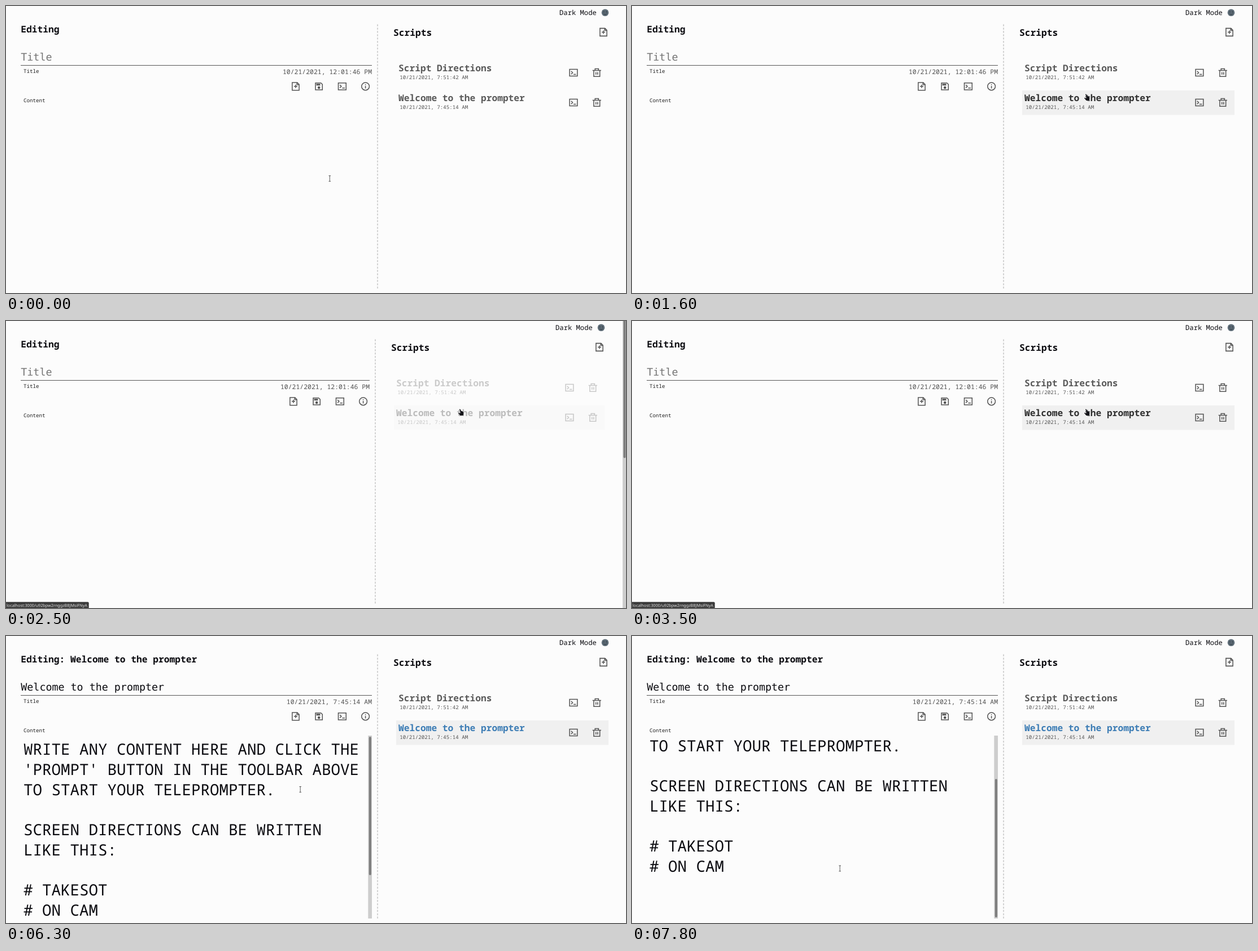
Recreate the animation shown at these times as an HTML page with a canvas. Size 1098 by 510 pixels, loop 8 s.

```html
<!DOCTYPE html>
<html lang="en">
<head>
<meta charset="utf-8">
<title>Prompter editor</title>
<style>
html, body { margin: 0; width: 100%; height: 100%; overflow: hidden; background: #fcfcfc; }
canvas { display: block; width: 1098px; height: 510px; }
</style>
</head>
<body>
<canvas id="stage"></canvas>
<script>
const W = 1098, H = 510, LOOP = 8000;
const MONO = '"Noto Sans Mono", "Liberation Mono", monospace';
const FIELD = '"DejaVu Sans Mono", monospace';
const INK = '#0b0b10', GREY = '#5a5a5a', BLUE = '#3d7db5';

const canvas = document.getElementById('stage');
const ctx = canvas.getContext('2d');
const dpr = window.devicePixelRatio || 1;
canvas.width = W * dpr;
canvas.height = H * dpr;
ctx.textRendering = 'geometricPrecision';

const LINES = [
  'WRITE ANY CONTENT HERE AND CLICK THE',
  "'PROMPT' BUTTON IN THE TOOLBAR ABOVE",
  'TO START YOUR TELEPROMPTER.',
  '',
  'SCREEN DIRECTIONS CAN BE WRITTEN',
  'LIKE THIS:',
  '',
  '# TAKESOT',
  '# ON CAM'
];
const SCRIPTS = [
  { title: 'Script Directions', date: '10/21/2021, 7:51:42 AM', y: 116 },
  { title: 'Welcome to the prompter', date: '10/21/2021, 7:45:14 AM', y: 169 }
];

// Icons on a 24 unit grid: stroked lines plus optional filled parts
const ICONS = {
  add: { line: 'M4 3H15.6L20 7.4V21H4Z M15 3V8H20 M12 8V16 M8 12H16' },
  save: { line: 'M4 4H16.6L20 7.4V20H4Z', fill: 'M6 6H15V10H6Z M9 15a3 3 0 1 0 6 0a3 3 0 1 0 -6 0' },
  prompt: { line: 'M3 4H21V20H3Z M12 16H18 M6.5 8.5L10 12L6.5 15.5' },
  info: { line: 'M3 12a9 9 0 1 0 18 0a9 9 0 1 0 -18 0 M12 7V9 M12 11V17' },
  trash: { line: 'M2 7H22 M5 7V21H19V7 M8 7V3H16V7 M10 11V17 M14 11V17' }
};
for (const icon of Object.values(ICONS)) {
  icon.line = new Path2D(icon.line);
  if (icon.fill) icon.fill = new Path2D(icon.fill);
}
const HAND = new Path2D('M-1.8 -5.2C-2.4 -6.3 -.9 -6.9 -.3 -5.8L1.2 -2.7C2 -3.1 2.7 -2.9 3 -2.3C3.7 -2.5 4.2 -2 4.4 -1.4C5 -1.4 5.3 -.9 5.3 -.2V3.2L4.6 5.2H-.4L-3.7 1.4C-4.3 .6 -3.3 -.1 -2.5 .4L-1 1.4L-.4 -.9Z');
const ARROW = new Path2D('M0 0V10L2.4 7.8L4 11.2L5.5 10.5L4 7.3H7.2Z');

function text(str, x, y, size, color, { font = MONO, bold = false, align = 'left' } = {}) {
  ctx.font = `${bold ? 'bold ' : ''}${size}px ${font}`;
  ctx.textAlign = align;
  ctx.fillStyle = color;
  ctx.fillText(str, x, y);
}

function rect(x, y, w, h, color, radius = 0) {
  ctx.fillStyle = color;
  ctx.beginPath();
  ctx.roundRect(x, y, w, h, radius);
  ctx.fill();
}

function drawIcon(name, cx, cy) {
  const { line, fill } = ICONS[name];
  const s = 18.33 / 24;
  ctx.save();
  ctx.translate(cx, cy);
  ctx.scale(s, s);
  ctx.translate(-12, -12);
  ctx.strokeStyle = ctx.fillStyle = '#545454';
  ctx.lineWidth = 2;
  ctx.stroke(line);
  if (fill) ctx.fill(fill);
  ctx.restore();
}

function drawMoon(x, y) {
  const disc = (dx, dy, r, color) => {
    ctx.fillStyle = color;
    ctx.beginPath();
    ctx.arc(x + dx, y + dy, r, 0, Math.PI * 2);
    ctx.fill();
  };
  disc(0, 0, 6.3, '#5d6b76');
  disc(-2.2, -1.2, 1, '#2b343b');
  disc(2.2, -1.2, 1, '#2b343b');
  ctx.strokeStyle = '#2b343b';
  ctx.lineWidth = 1;
  ctx.beginPath();
  ctx.arc(x, y + 0.6, 2.8, 0.3, Math.PI - 0.3);
  ctx.stroke();
}

function drawHeader(sl, sr) {
  text('Dark Mode', 980 - sr, 16.3, 12.2, INK);
  drawMoon(1061 - sr, 11.8);
  text('Scripts', 686 - sl, 53, 16.25, INK, { bold: true });
  drawIcon('add', 1058 - sr, 46.5);
  ctx.strokeStyle = '#b4b4b4';
  ctx.lineWidth = 1.15;
  ctx.setLineDash([3.5, 2.4]);
  ctx.beginPath();
  ctx.moveTo(658 - sl, 32.5);
  ctx.lineTo(658 - sl, 502);
  ctx.stroke();
  ctx.setLineDash([]);
}

function drawEditor(loaded, sl) {
  const name = SCRIPTS[1].title;
  text(loaded ? 'Editing: ' + name : 'Editing', 26.3, 47, 16.25, INK, { bold: true });
  text(loaded ? name : 'Title', 26.3, 97, 18.34, loaded ? INK : '#757575', { font: FIELD });
  rect(26, 105, 622 - sl, 1, '#555');
  text('Title', 31, 118.7, 9.17, '#222');
  text(loaded ? SCRIPTS[1].date : '10/21/2021, 12:01:46 PM', 648 - sl, 121, 11.46, '#505050', { align: 'right' });
  ['add', 'save', 'prompt', 'info'].forEach((n, i) => drawIcon(n, 513 + i * 41.2 - sl, 142.8));
  text('Content', 31, 171.3, 9.17, '#222');
}

function drawContent(scroll) {
  ctx.save();
  ctx.beginPath();
  ctx.rect(26, 177, 622, 325);
  ctx.clip();
  LINES.forEach((s, i) => text(s, 31, 211 + i * 35.75 - scroll, 27.5, INK));
  rect(641.3, 177, 6.7, 325, '#cdcdcd');
  rect(642.8, 179 + scroll * 0.96, 4, 246, '#7c7c7c', 2);
  ctx.restore();
}

function drawList({ alpha, rowBg, rowColor, sl, sr }) {
  ctx.globalAlpha = alpha;
  if (rowBg) rect(691 - sl, 150, 376 + sl - sr, 43.5, rowBg);
  SCRIPTS.forEach(({ title, date, y }, i) => {
    text(title, 695 - sl, y, 16.23, i ? rowColor : GREY, { bold: true });
    text(date, 697.3 - sl, y + 14.2, 9.17, '#555');
    drawIcon('prompt', 1005 - sr, y + 2.5);
    drawIcon('trash', 1046.3 - sr, y + 2.3);
  });
  ctx.globalAlpha = 1;
}

function drawStatus() {
  rect(0, 499.3, 146.7, 11, '#3b3b3b', [0, 2, 0, 0]);
  text('localhost:3000/u92bpw2rnggzB8JMsiFNyA', 1, 507.8, 7.22, '#e4e4e4', { font: '"Noto Sans", sans-serif' });
}

function drawPointer({ x, y, kind }) {
  ctx.save();
  ctx.translate(x, y);
  ctx.lineJoin = 'round';
  if (kind === 'beam') {
    ctx.strokeStyle = '#4a4a4a';
    ctx.lineWidth = 0.9;
    ctx.stroke(new Path2D('M-1.8 -5H1.8 M0 -5V5 M-1.8 5H1.8'));
  } else {
    const shape = kind === 'hand' ? HAND : ARROW;
    ctx.strokeStyle = '#fff';
    ctx.lineWidth = 0.8;
    ctx.stroke(shape);
    ctx.fillStyle = '#15151a';
    ctx.fill(shape);
  }
  ctx.restore();
}

function pointerAt(t) {
  if (t >= 7800) return { x: 368.2, y: 413, kind: 'beam' };
  if (t >= 6500) return { x: 477.6, y: 300.8, kind: 'beam' };
  if (t >= 6300) return { x: 521.2, y: 272.6, kind: 'beam' };
  const p = Math.min(1, Math.max(0, (t - 900) / 600));
  const e = p * p * (3 - 2 * p);
  const x = 573.3 + 231.7 * e, y = 306.6 - 143.8 * e;
  const overRow = x > 691 && y > 150 && y < 193;
  return { x, y, kind: overRow ? 'hand' : x < 648 ? 'beam' : 'arrow' };
}

function listAt(t, pointer) {
  const list = { alpha: 1, rowBg: null, rowColor: GREY, sl: 0, sr: 0 };
  if (t < 2900) {
    if (pointer.kind === 'hand') {
      list.rowBg = '#f0f0f0';
      list.rowColor = '#303030';
    }
    if (t >= 2100) {
      list.alpha = Math.max(0.3, 0.9 - (t - 2100) / 400 * 0.6);
      list.sl = 4;
      list.sr = 7;
    }
  } else if (t >= 3500) {
    list.rowBg = '#f0f0f0';
    list.rowColor = t >= 3700 ? BLUE : '#303030';
  }
  return list;
}

function draw(now) {
  const t = Math.floor((now % LOOP) / 100) * 100;
  const pointer = pointerAt(t);
  const list = listAt(t, pointer);
  const loaded = t >= 3700;

  ctx.setTransform(dpr, 0, 0, dpr, 0, 0);
  rect(0, 0, W, H, '#fcfcfc');
  drawHeader(list.sl, list.sr);
  drawEditor(loaded, list.sl);
  if (loaded) drawContent(t >= 7000 ? 78 : t >= 6800 ? 30 : 0);
  drawList(list);
  if (list.sr) {
    rect(1092, 0, 6, H, '#cdcdcd');
    rect(1093.5, 0, 4, 243.5, '#7c7c7c', [0, 0, 2, 2]);
  }
  if (t >= 1700 && !loaded) drawStatus();
  drawPointer(pointer);
}

const start = performance.now();
function tick() {
  draw(performance.now() - start);
  requestAnimationFrame(tick);
}
tick();
</script>
</body>
</html>
```
